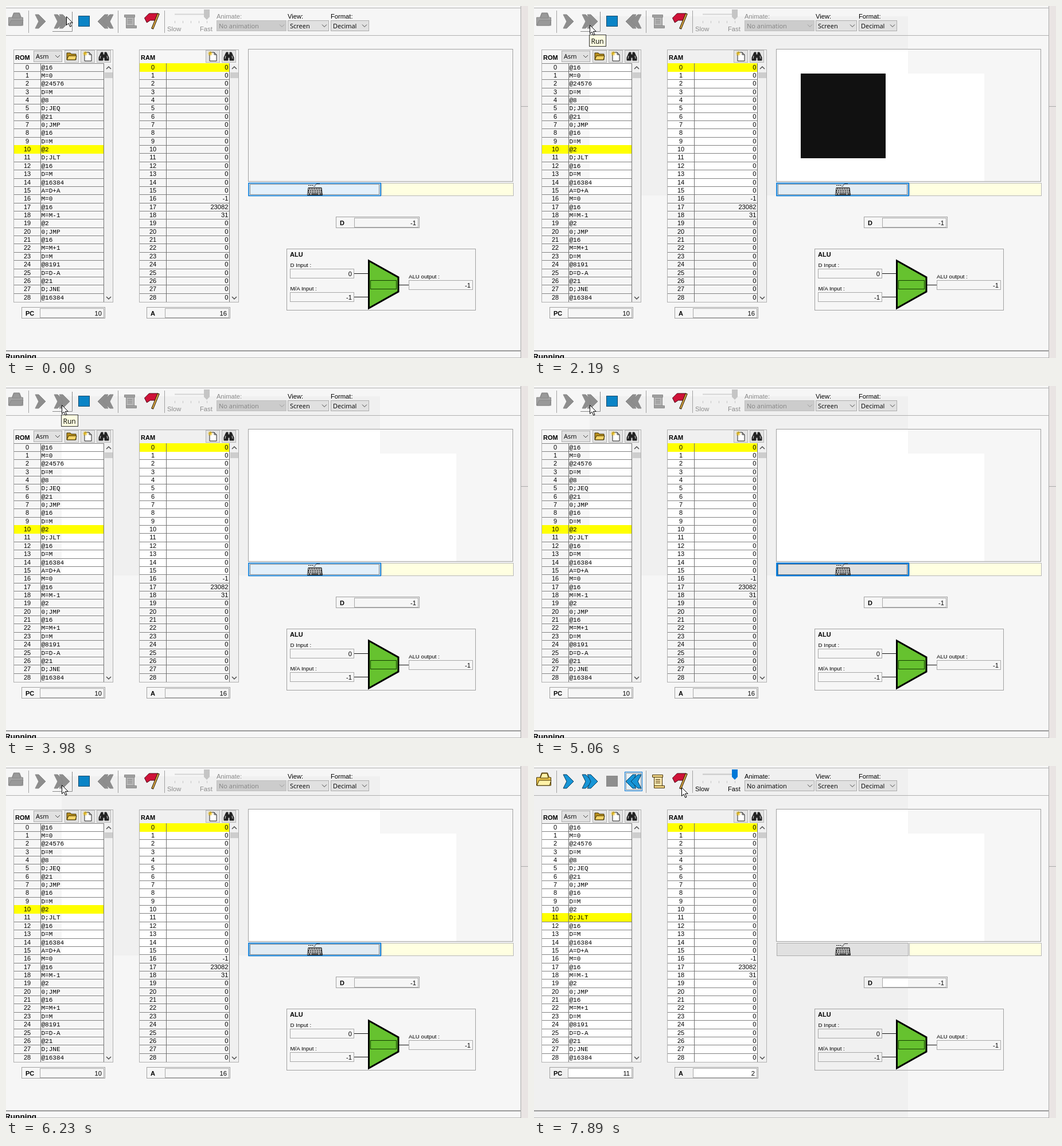
Write an HTML page that moves like this. It is 910 px wide and 615 px high and loops after 8 s.

```html
<!DOCTYPE html>
<html lang="en">
<head>
<meta charset="utf-8">
<title>CPU emulator</title>
<style>
html, body { margin: 0; width: 100%; height: 100%; overflow: hidden; background: #f6f6f6; }
svg { display: block; width: 910px; height: 615px; }
text { font-family: "Liberation Sans", Arial, sans-serif; white-space: pre; }
.mono { font-family: "Liberation Mono", monospace; }
.ui { font-family: "Open Sans", sans-serif; }
</style>
</head>
<body>
<svg id="stage" viewBox="0 0 910 615" xmlns="http://www.w3.org/2000/svg"></svg>
<script>
const LOOP = 8000, STOP = 7000;
const stage = document.getElementById('stage');

const rect = (x, y, w, h, fill = 'none', stroke = 'none', more = '') =>
  `<rect x="${x}" y="${y}" width="${w}" height="${h}" fill="${fill}" stroke="${stroke}" ${more}/>`;
const box = (x, y, w, h, fill = 'none', stroke = '#a0a0a0') =>
  rect(x + .5, y + .5, w - 1, h - 1, fill, stroke);
const path = (d, stroke = '#a0a0a0', fill = 'none', more = '') =>
  `<path d="${d}" stroke="${stroke}" fill="${fill}" ${more}/>`;
const text = (x, y, s, size = 11, more = '') =>
  `<text x="${x}" y="${y}" font-size="${size}" ${more}>${s}</text>`;
const group = (id, body) => `<g id="${id}">${body}</g>`;
const at = (x, y, body) => `<g transform="translate(${x} ${y})">${body}</g>`;
const right = 'text-anchor="end"', mid = 'text-anchor="middle"', bold = 'font-weight="700"';
const thick = n => `stroke-width="${n}"`, dash = s => `stroke-dasharray="${s}"`;

const program = ('@16 M=0 @24576 D=M @8 D;JEQ @21 0;JMP @16 D=M @2 D;JLT @16 D=M @16384 A=D+A ' +
  'M=0 @16 M=M-1 @2 0;JMP @16 M=M+1 D=M @8191 D=D-A @21 D;JNE @16384').split(' ');
const memory = program.map((_, i) => ({ 16: -1, 17: 23082, 18: 31 })[i] ?? 0);
const rowTop = i => Math.floor(100 + 14.36 * i);

// A grid with row numbers and a scrollbar; the marked row covers its grid lines.
function table(x, marked, id, cells) {
  const lines = cells.map((_, i) => `M${x} ${rowTop(i) + .5}h156`).join('');
  let s = path(lines, '#808080') + rect(x, rowTop(marked), 156, 15, '#ff0', 'none', `id="${id}"`);
  s += path(`M${x + 156.5} 100V517M${x + 46.5} 100V517`, '#707070');
  cells.forEach((cell, i) => {
    const y = rowTop(i) + 11;
    s += text(x + 23, y, i, 11, mid) + cell(y);
  });
  s += rect(x + 157, 101, 16, 416, '#f0f0f0') + rect(x + 158, 116, 14, 10, '#cdcdcd');
  s += path(`M${x + 161} 110l4-4 4 4M${x + 161} 508l4 4 4-4`, '#505050', 'none', thick(1.5));
  return s + box(x - 1, 76, 174, 442, 'none', '#b0b0b0');
}

function combo(x, y, w, h, label, off) {
  return box(x, y, w, h, off ? '#ccc' : '#e1e1e1', off ? '#bfbfbf' : '#adadad') +
    text(x + 4, y + h / 2 + 4, label, 11, `class="ui" fill="${off ? '#838383' : '#000'}"`) +
    path(`M${x + w - 12} ${y + h / 2 - 2}l4 4 4-4`, off ? '#999' : '#444');
}

const field = (x, y, value, id = '') => box(x, y, 112, 17, 'none', '#a8a8a8') +
  text(x + 108, y + 13, value, 11.2, right + (id && ` id="${id}"`));
const register = (x, y, name, value, id) => box(x, y, 146, 20) +
  text(x + 7, y + 15, name, 11, bold) + field(x + 32, y + 2, value, id);

const button = (x, icon) => box(x, 77, 25, 22, '#e4e4e4', '#b4b4b4') + at(x, 77, icon);
const folder = path('M4 17V5h6l2 2h8v10z', '#3d2e00', '#b98f1c') +
  path('M4 17l3-7h14l-2 7z', '#3d2e00', '#f5d467');
const page = path('M7 4h8l4 4v11H7zM15 4v4h4', '#222', '#fff') +
  path('M8 2v8M4 6h8M5 3l6 6M11 3l-6 6', '#e9b800');
const glasses = path('M8 4h3v4h3V4h3l4 9v5h-7v-5h-3v5H4v-5z', '#222', '#222') +
  path('M7 10l-1 5M18 10l1 5', '#ddd');

function toolbar(on) {
  const ink = on ? '#433000' : '#888', tint = on ? '#000' : '#8a8a8a';
  const chevron = (x, dir) => `<path transform="translate(${x} 15) scale(${dir} 1)"
    d="M0 0h6l12 12-12 12h-6l6-12z" fill="${on ? '#1795d6' : '#8e8e8e'}" stroke="${on ? '#083a5c' : '#888'}"/>`;
  const label = (x, y, s) => text(x, y, s, 11.2, `fill="${tint}"`);
  return path('M4.5 34V20h6l3-8h10l3 8h3v14z', ink, on ? '#e8c24a' : '#a2a2a2') +
    path('M11 21h14l-2-8h-9zM5 34l4-9h21l-3 9z', ink, on ? '#fff2a8' : '#999') +
    chevron(51, 1) + chevron(84, 1) + chevron(93, 1) +
    rect(126.5, 17.5, 19, 18, on ? '#8e8e8e' : '#0a84c6', on ? '#888' : '#10486b') +
    (on ? box(158, 10, 31, 34, '#e5f1fb', '#0078d7') + rect(160.5, 12.5, 26, 29, 'none', '#333', dash('1 1')) : '') +
    chevron(178, -1) + chevron(187, -1) +
    path('M209.5 17h14v19h-14z', ink, on ? '#fbe7b0' : '#b4b4b4') +
    path('M206.5 15.5h18v4h-18zM209.5 34.5h18v4h-18z', ink, on ? '#f3d78a' : '#a2a2a2') +
    path('M212 23.5h8M212 26.5h8M212 29.5h8', ink) +
    path('M294 14.5h52', on ? '#c8c8c8' : '#d5d5d5', 'none', thick(2)) +
    path('M294.5 26v4M308.5 26v4M322.5 26v4M336.5 26v4M350.5 26v4', '#c4c4c4') +
    path('M345 6h10v13l-5 5-5-5z', 'none', on ? '#0078d7' : '#c5c5c5') +
    label(281, 44, 'Slow') + label(338, 44, 'Fast') + label(367, 22, 'Animate:') +
    combo(367, 25, 122, 19, 'No animation', !on);
}

const keyboardIcon = path('M527 313.5h8l3 2 3-5h6', '#111', 'none', dash('2 1')) +
  path('M527 317.5h23l1.5 13h-26z', '#111', '#fff') +
  path('M528 319.5h22M527 322.5h24M527 325.5h24', '#111', 'none', thick(2) + dash('2 1')) +
  path('M527 328.5h4M532 328.5h13M546 328.5h5', '#111', 'none', thick(2));

const flag = path('M241.5 21l8-8h15l-4 12h-9l-6 4z', '#4a0010', '#cf1238') +
  path('M266 13l-11 27', '#2b1c00', 'none', thick(4)) +
  path('M265.5 14l-10 25', '#e8b34a', 'none', thick(2));

// Areas repainted in brighter tones, revealed by a clip rectangle.
const repaint = rect(0, 5, 652, 609, '#f0f0f0') + [
  [14, 100, 156, 417], [233, 100, 156, 417], [423, 76, 362, 231],
  [59, 528, 112, 17], [277, 528, 112, 17], [607, 370, 112, 17]
].map(r => rect(...r, '#fff')).join('');

stage.innerHTML =
  `<defs><clipPath id="clip">${rect(0, 0, 0, 0, '#000', 'none', 'id="area"')}</clipPath></defs>` +
  rect(0, 0, 910, 615, '#f6f6f6') +
  `<g clip-path="url(#clip)">${repaint}</g>` +
  rect(652, 118, 133, 189, '#fff', 'none', 'id="side"') +
  path('M0 3.5h897M0 51.5h897', '#b0b0b0') +
  path('M39.5 8v39M195.5 8v39M276.5 8v39', '#a0a0a0') +
  group('idle', toolbar(true)) + group('busy', toolbar(false)) +
  group('hover', path('M0 34.5h34.5V0', '#888')) + flag +
  text(491, 22, 'View:', 11.2) + combo(491, 25, 72, 19, 'Screen') +
  text(566, 22, 'Format:', 11.2) + combo(566, 25, 67, 19, 'Decimal') +
  text(16, 94, 'ROM', 11, bold) + text(235, 94, 'RAM', 11, bold) +
  combo(48, 78, 50, 20, 'Asm') +
  button(102, folder) + button(130, page) + button(158, glasses) +
  button(348, page) + button(376, glasses) +
  table(14, 10, 'current', program.map(code => y => text(61.5, y, code, 11, 'class="mono"'))) +
  table(233, 0, 'first', memory.map(value => y => text(387.5, y, value, 11.2, right))) +
  register(27, 526, 'PC', 10, 'pc') + register(245, 526, 'A', 16, 'a') + register(575, 368, 'D', -1) +
  box(422, 75, 462, 232) +
  rect(465, 118, 148, 148, '#111', 'none', 'id="mark"') +
  box(423, 309, 230, 23, '#e1e1e1', '#adadad') +
  group('focus',
    rect(423, 309.5, 230, 22, '#e5f1fb', '#0078d7', thick(1.6)) +
    group('pulse', rect(424, 310, 229, 21, '#e1e1e1', '#0078d7', thick(2.4))) +
    rect(425.5, 311.5, 225, 18, 'none', '#222', dash('1 1'))) +
  keyboardIcon +
  box(654, 309, 231, 23, '#ffffe1', '#b8b8b8') +
  text(768.5, 325, '', 11.5, `${bold} ${mid} id="key"`) +
  box(489, 424, 330, 108) + text(495, 438, 'ALU', 11, bold) +
  text(495.5, 456, 'D Input :', 9.7) + field(495, 459, 0) +
  text(495.5, 497, 'M/A Input :', 9.7) + field(495, 500, -1) +
  text(702, 476, 'ALU output :', 9.7) + field(702, 479, -1) +
  path('M607 467.5h25M607 508.5h25M684 487.5h18', '#111') +
  path('M632.5 445l51.5 29v25l-51.5 29z', '#000', '#66c22f', thick(3)) +
  box(635, 479, 46, 16, 'none', '#123b00') +
  path('M0 602.5h897', '#777', 'none', thick(1.5)) + path('M0 614.5h897', '#bbb') +
  text(-2, 617, 'Running', 13.6, `${bold} id="status"`) +
  rect(898, 0, 12, 615, '#e9e4e3') + path('M897.5 0V615M898 175.5h12', '#aaa') +
  group('tip', box(96, 50, 30, 21, '#ffffe1', '#333') + text(99.5, 66, 'Run', 12, 'class="ui"')) +
  group('cursor', path('M.5.5v15l3.5-3.3 2.7 6 2.3-1-2.6-5.8h4.8z', '#000', '#fff'));

const el = Object.fromEntries([...stage.querySelectorAll('[id]')].map(e => [e.id, e]));
const show = (name, on) => { el[name].style.visibility = on ? 'visible' : 'hidden'; };
const move = (name, x, y) => el[name].setAttribute('transform', `translate(${x} ${y})`);

// Each key press is followed by the drawing, which is soon cleared again.
const keyTimes = [[1520, 2190, 'Space'], [2710, 2980, 'Space'], [3460, 3720, 'G'], [4520, 4790, 'G']];
const markTimes = [[2190, 2450], [2980, 3160], [3720, 3980], [4790, 5060], [5600, 5870]];
const cursorSteps = [
  [0, 105, 18], [120, 103, 22], [260, 100, 28], [400, 97, 33],
  [6660, 110, 31], [6800, 127, 29], [7610, 190, 50], [7750, 322, 72], [7890, 257, 37]
];
const during = (t, spans) => spans.find(([from, to]) => t >= from && t < to);

function draw(t) {
  const stopped = t >= STOP;
  show('idle', stopped);
  ['busy', 'status', 'focus', 'pulse'].forEach(name => show(name, !stopped));
  show('mark', during(t, markTimes));
  show('tip', t >= 1250 && t < 4930);
  show('side', t >= 970);
  el.key.textContent = during(t, keyTimes)?.[2] ?? '';

  const [x, y, width, height] = stopped ? [0, 5, 652, 609] : t < 120 ? [0, 0, 0, 0] : [97, 18, 555, 313];
  Object.entries({ x, y, width, height }).forEach(([k, v]) => el.area.setAttribute(k, v));

  el.current.setAttribute('y', rowTop(stopped ? 11 : 10));
  el.pc.textContent = stopped ? 11 : 10;
  el.a.textContent = stopped ? 2 : 16;

  // The default button fades between its two looks every second.
  const grey = 1 - Math.abs(1 - t % 2000 / 1000);
  el.pulse.style.opacity = Math.min(1, grey * 1.25);

  const [, cx, cy] = cursorSteps.findLast(step => step[0] <= t);
  move('cursor', cx, cy);
  show('hover', t < 7610);
  move('hover', cx < 118 ? 81 : 118, 10);
}

const start = performance.now();
function tick() {
  draw((performance.now() - start) % LOOP);
  requestAnimationFrame(tick);
}
tick();
</script>
</body>
</html>
```
